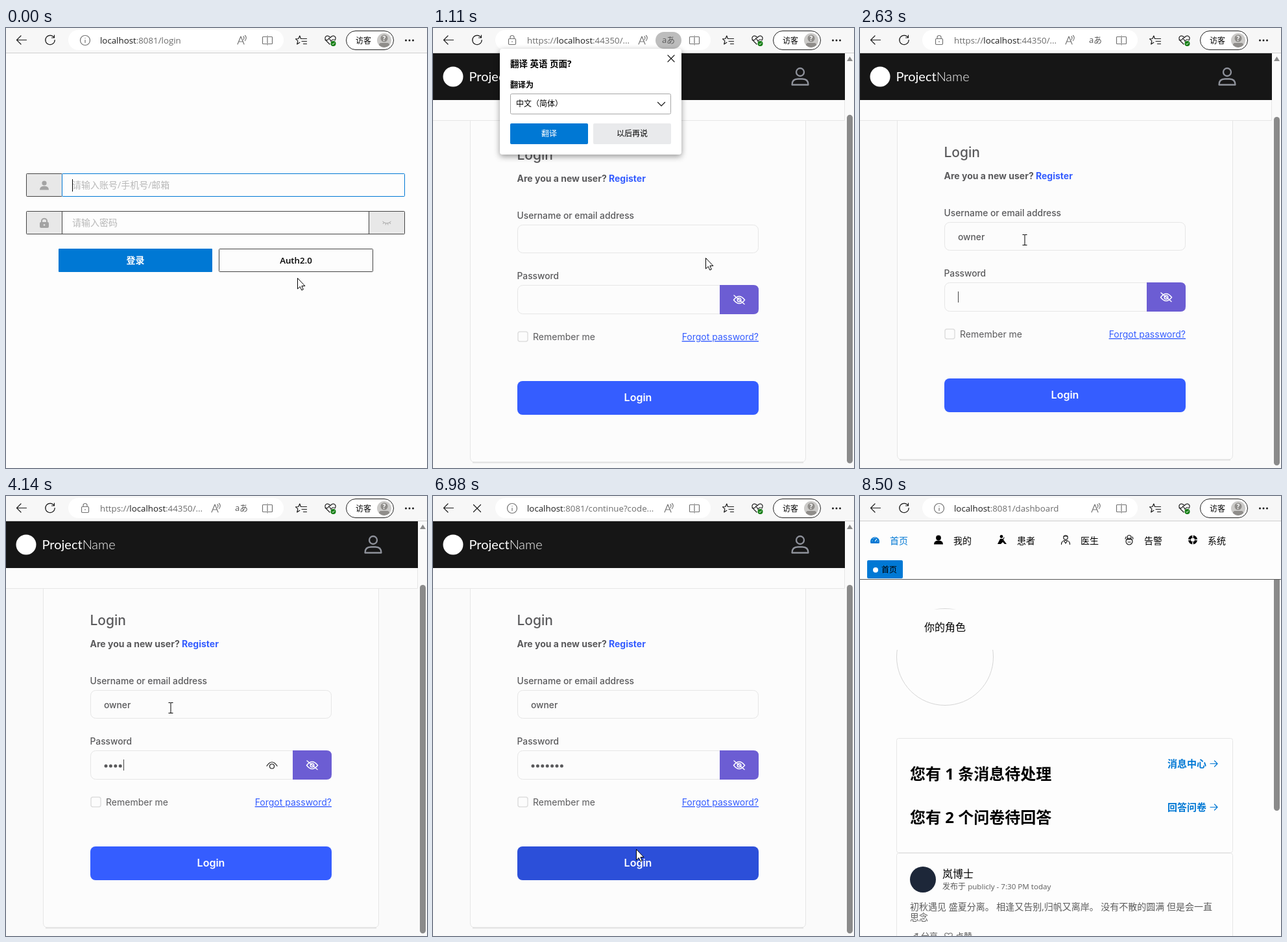
These frames come from a looping animation (649x678 px, 8.65 s). An HTML page:

```html
<!DOCTYPE html>
<html lang="zh-CN">
<head>
<meta charset="utf-8">
<title>Sign-in flow</title>
<style>
  html, body { margin: 0; width: 100%; height: 100%; overflow: hidden; background: #fdfdfd; }
  svg { display: block; width: 649px; height: 678px; }
  text { font-family: "Open Sans", "Noto Sans CJK SC", "Noto Sans CJK", sans-serif; font-size: 14px; white-space: pre; }
  .auth text { font-family: Inter, sans-serif; fill: #5a5a5c; }
  .auth .brand { font: 20px Lato, sans-serif; fill: #fff; }
  .auth .label { font-size: 13.8px; font-weight: 500; }
  .auth .link { fill: #355dff; }
  .auth .white { fill: #fff; }
  .url { font-size: 13.3px; fill: #6c6c6c; }
  .url .host { fill: #1c1c1c; }
  .mid { text-anchor: middle; }
  .b { font-weight: 600; }
  .bb { font-weight: 700; }
  .s { font-size: 12px; }
  .hint { fill: #b8b8b8; }
  .blue { fill: #0078d4; }
  .white { fill: #fff; }
  .gray { fill: #5c5c5c; }
  .line { fill: none; stroke: #1c1c1c; stroke-width: 1.2; stroke-linecap: round; stroke-linejoin: round; }
  .soft { stroke: #737373; }
  .edge { fill: none; stroke: #e6e6e6; }
  .dark { fill: none; stroke: #444; }
  .addon { fill: #e8e8e8; }
  .thumb { fill: #8a8a8a; }
</style>
</head>
<body>
<svg viewBox="0 0 649 678">
  <rect width="649" height="678" fill="#fdfdfd"/>

  <g id="login">
    <path class="addon" d="M31 224h56v36h-56zM31 282h56v36h-56zM559 282h56v36h-56z"/>
    <rect class="dark" x="31.5" y="224.5" width="55" height="35" rx="1"/>
    <rect x="86.5" y="224.5" width="528" height="35" rx="1" fill="none" stroke="#0078d4"/>
    <rect class="dark" x="31.5" y="282.5" width="583" height="35" rx="1"/>
    <path class="dark" d="M86.5 282v36M559.5 282v36"/>
    <g fill="#a3a3a3">
      <circle cx="59" cy="239" r="3.6"/>
      <path d="M52 249.500q0-6 7-6t7 6z"/>
      <rect x="52" y="299" width="14" height="9" rx="2"/>
    </g>
    <path d="M55 299v-1.500a4 3.800 0 0 1 8 0v1.500" fill="none" stroke="#a3a3a3" stroke-width="2"/>
    <circle cx="59" cy="303.500" r="1.300" fill="#e8e8e8"/>
    <path d="M580.500 298q6.500 6 13 0M582.500 300l-1.500 2M585.500 301.500l-.5 2M588.500 301.500l.5 2M591.500 300l1.500 2" fill="none" stroke="#a3a3a3"/>
    <text class="hint" x="102" y="247">请输入账号/手机号/邮箱</text>
    <text class="hint" x="102" y="305">请输入密码</text>
    <path d="M102.500 233v19" stroke="#000"/>
    <rect class="blue" x="81" y="340" width="237" height="36" rx="1"/>
    <text class="mid b white" x="199.500" y="363">登录</text>
    <rect class="dark" x="328.500" y="340.500" width="237" height="35" rx="1"/>
    <text class="mid b" x="447" y="363" style="font-size:13.3px">Auth2.0</text>
  </g>

  <g id="auth" class="auth">
    <rect y="39" width="649" height="639" fill="#fafafa"/>
    <g id="scroll">
      <rect x="57" y="216" width="518" height="551" rx="7" fill="#fcfcfc"/>
      <path class="edge" d="M57.500 216v543q0 7 7 7h503q7 0 7-7V216"/>
      <path d="M61 766.500h510" stroke="#e2e2e2" stroke-width="2"/>
      <text x="129.500" y="300" style="font-size:21px;font-weight:500">Login</text>
      <text class="bb" x="129.500" y="334">Are you a new user? <tspan class="link" x="271">Register</tspan></text>
      <text class="label" x="129.500" y="391">Username or email address</text>
      <rect class="edge" x="130.500" y="400.500" width="371" height="43" rx="8"/>
      <text class="label" id="user" x="151" y="428"></text>
      <path id="userCaret" d="M0 414v17" stroke="#444"/>
      <text class="label" x="129.500" y="484">Password</text>
      <rect class="edge" x="130.500" y="493.500" width="371" height="44" rx="8"/>
      <g id="dots" fill="#5a5a5c"></g>
      <path id="passCaret" d="M0 507v17" stroke="#444"/>
      <g id="eye" class="line" stroke-width="1.500">
        <path d="M402 517q8-12 16 0"/><circle cx="410" cy="517.500" r="3.500"/>
      </g>
      <path d="M442 493h52q8 0 8 8v29q0 8-8 8h-52z" fill="#6c5dd3"/>
      <g fill="none" stroke="#fff" stroke-width="1.500" stroke-linecap="round">
        <path d="M463.500 516q8.500-11 17 0q-8.500 11-17 0M464 509l16 13.500"/><circle cx="472" cy="516" r="2.800"/>
      </g>
      <rect x="131" y="565" width="15" height="15" rx="3" fill="none" stroke="#dedede" stroke-width="1.500"/>
      <text x="154" y="578">Remember me</text>
      <text class="link" x="502" y="578" text-anchor="end" text-decoration="underline">Forgot password?</text>
      <rect id="submit" x="130" y="641" width="372" height="52" rx="8"/>
      <text class="mid b white" x="316" y="672" style="font-size:16px">Login</text>
    </g>
    <rect y="111" width="635" height="31" fill="#fcfcfc"/>
    <path class="edge" d="M0 142.500h634.500V111"/>
    <rect y="39" width="635" height="72" fill="#161616"/>
    <circle cx="31" cy="75" r="15.500" fill="#fff"/>
    <text class="brand" x="55.500" y="82">Project<tspan style="font-weight:300">Name</tspan></text>
    <g fill="none" stroke="#8f929b" stroke-width="2.300">
      <circle cx="566" cy="68" r="6"/>
      <path d="M553.500 87.500q0-9 9-9h7q9 0 9 9z" stroke-linejoin="round"/>
    </g>
    <rect x="635" y="39" width="14" height="639" fill="#fafafa"/>
    <path class="thumb" d="M638 51l4.500-7 4.500 7z"/>
    <rect class="thumb" id="thumb" x="638" y="57" width="9" height="537" rx="4.500"/>
  </g>

  <g id="dash">
    <g id="nav">
      <g id="tabs"></g>
      <path class="blue" d="M16.500 73a7 7.200 0 1 1 13 0z"/>
      <path d="M23 70l3-4M18.500 69h1M20 65.500l.6.600M23 64v1M27 69.500h.8" stroke="#fff" stroke-width="1.200"/>
      <circle cx="121" cy="64.500" r="3.900"/><path d="M114 74.500q0-6 7-6t7 6z"/>
      <circle cx="218" cy="62.500" r="2.400"/><path d="M212 74l4-8h4l6 8h-3l-3-3-3 3z"/>
      <path class="line" d="M222 64l-2 5"/>
      <g class="line"><circle cx="317" cy="64" r="3.200"/><path d="M310.500 74.500q0-6 6.500-6t6.500 6M314 62h6M314.500 69l2.500 4 2.500-4"/></g>
      <g class="line"><circle cx="415" cy="70" r="5"/><circle cx="415" cy="63.500" r="3"/><path d="M411 67h8M413 71h4M410 63l-1 3M420 63l1 3"/></g>
      <circle cx="513" cy="67.500" r="5" fill="none" stroke="#000" stroke-width="4"/>
      <path d="M513 60v4M513 71v4M505.500 67.500h4M516.500 67.500h4" stroke="#fdfdfd" stroke-width="1.500"/>
      <rect class="blue" x="11" y="99" width="55" height="28" rx="2"/>
      <circle cx="24" cy="114" r="4" fill="#fff"/>
      <text class="s" x="33" y="118">首页</text>
      <path d="M0 128.500h649" stroke="#555"/>
    </g>
    <g id="cards">
      <circle cx="131" cy="248" r="74.500" fill="none" stroke="#d6d6d6"/>
      <rect x="55" y="174.500" width="152" height="62.500" fill="#fdfdfd"/>
      <text x="99" y="208" style="font-size:16px">你的角色</text>
      <rect class="edge" x="56.500" y="373.500" width="518" height="176" rx="3"/>
      <g id="notes"></g>
      <path class="thumb" d="M638 129h9v351.500a4.500 4.500 0 0 1-9 0z"/>
    </g>
    <g id="post">
      <rect class="edge" x="56.500" y="550.500" width="518" height="150" rx="3"/>
      <circle cx="97" cy="591" r="20" fill="#1d2739"/>
      <text x="127" y="588" style="font-size:16px">岚博士</text>
      <text class="s gray" x="127" y="606">发布于 <tspan style="font-weight:500;font-size:11.600px">publicly - 7:30 PM today</tspan></text>
      <text class="gray" x="77" y="638">初秋遇见 盛夏分离。 相逢又告别,归帆又离岸。 没有不散的圆满 但是会一直</text>
      <text class="gray" x="77" y="653.500">思念</text>
      <g class="gray">
        <text x="94" y="682.500" style="font-size:13px">分享</text><text x="147" y="682.500" style="font-size:13px">点赞</text>
      </g>
      <path class="line soft" d="M80 680l8-5M85 674.500l4-.5-1 4M136.500 683l-5.500-5.500q-1-4 2.500-4 2 0 3 2 1-2 3-2 3.500 0 2.500 4z"/>
    </g>
  </g>

  <g>
    <rect width="649" height="38" fill="#f7f7f7"/>
    <path d="M0 38.500h649" stroke="#cfcfcf"/>
    <rect x="96" y="3" width="332" height="31" rx="15.500" fill="#fff"/>
    <path class="line" d="M16.500 18.500h15M23 12l-6.500 6.500L23 25"/>
    <path class="line" id="reload" d="M74 14.500a7.200 7.200 0 1 0 1.200 4M74.500 11v4h-4"/>
    <path class="line" id="stop" d="M62.500 13.500l11 11M73.500 13.500l-11 11"/>
    <g id="info" class="line soft"><circle cx="122" cy="19" r="7.500"/><path d="M122 18.500v4M122 15.500v.2"/></g>
    <g id="lock" class="line soft"><rect x="116.500" y="16.500" width="11" height="9" rx="1.500"/><path d="M119 16v-1.500a3 3 0 0 1 6 0V16M122 20.500v1"/></g>
    <text class="url" x="145" y="24"><tspan id="scheme"></tspan><tspan class="host">localhost</tspan><tspan id="path"></tspan></text>
    <rect id="pill" x="343" y="6" width="40" height="26" rx="13" fill="#bdbdbd"/>
    <text id="lang" class="mid gray" x="363" y="23" style="font-size:13px">aあ</text>
    <g id="read" class="line soft"><path d="M357 25l5-12 5 12M358.800 21h6.400M366 13q2 2 0 5M368.500 11.500q3.500 3.500 0 8"/></g>
    <path class="line soft" d="M401.500 13.500h-5q-1 0-1 1v9q0 1 1 1h5M404.500 13.500h5q1 0 1 1v9q0 1-1 1h-5M403 12v14"/>
    <path class="line" d="M457 16.500h-2.500l-1.700-4.500-1.900 4.500-4.400.4 3.400 3-1.200 5 4.100-2.700M457 16.500h6.500M456 20.500h7.500M458.500 24.500h5"/>
    <path class="line" d="M499 25l-6-6q-3-5 2-7 3 0 5 3 2-3 5-3 5 2 2 7M492 18.500h4l2-3 3 5 2-2.500h3"/>
    <circle cx="504.500" cy="24" r="4" fill="#107c10"/><path d="M502.500 24l1.500 1.500 2.500-3" fill="none" stroke="#fff"/>
    <rect x="524.500" y="4.500" width="73" height="29" rx="14.500" fill="#fff" stroke="#222"/>
    <text class="s" x="539" y="23.500">访客</text>
    <circle cx="583" cy="19" r="11" fill="#cbcac8"/>
    <path d="M575 26.500q0-3.500 3-3.500h10q3 0 3 3.500-8 7-16 0z" fill="#8f8d8a"/>
    <circle cx="583" cy="16" r="5.500" fill="#8f8d8a"/>
    <text class="mid bb white" x="583" y="19.500" style="font-size:10px">?</text>
    <g fill="#1c1c1c"><circle cx="616.500" cy="19" r="1.500"/><circle cx="622" cy="19" r="1.500"/><circle cx="627.500" cy="19" r="1.500"/></g>
  </g>

  <g id="popup">
    <rect x="103" y="32" width="280" height="163" rx="4" fill="#fff" style="filter:drop-shadow(0 3px 5px #0006)"/>
    <text class="bb" x="119" y="60" style="font-size:13.500px">翻译 英语 页面?</text>
    <path class="line" stroke-width="1" d="M362 42l10 10M372 42l-10 10"/>
    <text class="s bb" x="119" y="92">翻译为</text>
    <rect x="119.500" y="101.500" width="247" height="31" rx="2" fill="#fff" stroke="#a6a6a6"/>
    <text class="s" x="128" y="121">中文（简体）</text>
    <path class="line" d="M346.500 114.500l5.500 5.500 5.500-5.500"/>
    <rect x="119" y="147" width="120" height="32" rx="2" class="blue"/>
    <rect x="247" y="147" width="120" height="32" rx="2" fill="#e9eaec"/>
    <text class="s mid white" x="179" y="167">翻译</text>
    <text class="s mid" x="307" y="167">以后再说</text>
  </g>

  <g id="cursor" stroke="#000" fill="#fff">
    <path id="arrow" d="M.5.500v16.500l3.800-3.500 2.500 5.500 2.500-1.100-2.400-5.400h5z"/>
    <path id="hand" d="M4.500 12V2q0-1.500 1.500-1.500T7.500 2v6q5-.5 8.500 2v5q0 3-2 5.500H6.500Q4 17 1 13q1-2.500 3.500-1z"/>
    <path id="beam" d="M-3.500-8.500h3l.5.500.5-.5h3M0-8V7.500M-3.500 7.500h7" fill="none"/>
  </g>
</svg>
<script>
const LOOP = 8650;
const $ = id => document.getElementById(id);
const show = (id, on) => $(id).style.display = on ? '' : 'none';

const URLS = {
  login: ['', ':8081/login'],
  account: ['https://', ':44350/Accou...'],
  short: ['https://', ':44350/...'],
  next: ['', ':8081/continue?code...'],
  home: ['', ':8081/dashboard']
};
const USER = 'owner';
const at = (kind, x, y) => ({ kind, x, y });

// Each step lists only what changes at that time.
const steps = [
  [0, { page: 'login', url: 'login', busy: 0, popup: 0, scroll: 0, typed: 0, dots: 0, focus: '', eye: 0, hover: 0, parts: 0, ...at('arrow', 449, 385) }],
  [120, at('hand', 441, 363)],
  [240, { busy: 1 }],
  [360, { page: 'blank', url: 'account', ...at('arrow', 441, 363) }],
  [570, { page: 'auth' }],
  [690, { scroll: 0, ...at('arrow', 438, 362) }],
  [830, { scroll: 32, busy: 0, ...at('arrow', 432, 360) }],
  [970, { scroll: 74, url: 'short', popup: 1, ...at('arrow', 425, 356) }],
  [1110, { scroll: 97, ...at('arrow', 420, 354) }],
  [1230, { scroll: 101, ...at('arrow', 370, 352) }],
  [1360, at('arrow', 300, 346)],
  [1500, at('arrow', 259, 341)],
  [1640, at('beam', 254, 327)],
  [1780, { popup: 0, focus: 'user' }],
  [2080, { typed: 1 }],
  [2260, { typed: 3 }],
  [2440, { typed: 5 }],
  [2630, { focus: 'pass' }],
  [3200, { dots: 1, eye: 1 }],
  [3460, { dots: 2 }],
  [3740, { dots: 3 }],
  [4140, { dots: 4 }],
  [4450, { dots: 5 }],
  [4750, { dots: 6 }],
  [5280, { focus: '' }],
  [5430, { dots: 7, focus: 'pass' }],
  [5870, { focus: '', ...at('beam', 345, 348) }],
  [5990, at('beam', 352, 414)],
  [6110, at('arrow', 336, 496)],
  [6230, { hover: 1, ...at('hand', 318, 542) }],
  [6390, { eye: 0, ...at('hand', 311, 545) }],
  [6550, { busy: 1 }],
  [6980, { url: 'next', ...at('arrow', 313, 544) }],
  [7540, { page: 'blank' }],
  [7660, { page: 'dash', url: 'home', parts: 1 }],
  [7800, { busy: 0, parts: 2 }],
  [7930, { parts: 3 }],
  [8060, at('arrow', 385, 580)],
  [8200, at('arrow', 480, 620)],
  [8340, at('arrow', 575, 655)],
  [8500, { kind: '' }]
];

['首页', '我的', '患者', '医生', '告警', '系统'].forEach((name, i) => {
  $('tabs').innerHTML += `<text x="${46 + 98 * i}" y="74" ${i ? '' : 'class="blue"'}>${name}</text>`;
});
[['您有 1 条消息待处理', '消息中心'], ['您有 2 个问卷待回答', '回答问卷']].forEach(([title, link], i) => {
  const y = 67 * i;
  $('notes').innerHTML += `<text class="bb" x="77" y="${437 + y}" style="font-size:24px">${title}</text>
    <text class="bb blue" x="474" y="${418 + y}" style="font-size:15px">${link}</text>
    <path class="line" style="stroke:#0078d4" d="M540 ${412.5 + y}h11m-4.500-4.500l4.500 4.500-4.500 4.500"/>`;
});
for (let i = 0; i < 7; i++) {
  $('dots').innerHTML += `<circle cx="${154 + 7.4 * i}" cy="517" r="2.500"/>`;
}

function render(s) {
  for (const p of ['login', 'auth', 'dash']) show(p, s.page === p);
  ['nav', 'cards', 'post'].forEach((id, i) => show(id, s.parts > i));
  const [scheme, path] = URLS[s.url];
  $('scheme').textContent = scheme;
  $('path').textContent = path;
  const short = s.url === 'short';
  show('lock', scheme);
  show('info', !scheme);
  show('stop', s.busy);
  show('reload', !s.busy);
  show('lang', short);
  show('pill', s.popup);
  show('popup', s.popup);
  $('read').setAttribute('transform', `translate(${short ? -40 : 0} 0)`);

  $('scroll').setAttribute('transform', `translate(0 ${-s.scroll})`);
  $('thumb').setAttribute('y', 57 + s.scroll * 0.792);
  $('user').textContent = USER.slice(0, s.typed);
  [...$('dots').children].forEach((d, i) => d.style.display = i < s.dots ? '' : 'none');
  show('eye', s.eye);
  show('userCaret', s.focus === 'user');
  show('passCaret', s.focus === 'pass');
  const end = s.typed ? $('user').getComputedTextLength() : 0;
  $('userCaret').setAttribute('transform', `translate(${151.5 + Math.round(end)} 0)`);
  $('passCaret').setAttribute('transform', `translate(${Math.round(151 + 7.4 * s.dots) + 0.5} 0)`);
  $('submit').setAttribute('fill', s.hover ? '#2c4fd9' : '#355dff');

  for (const k of ['arrow', 'hand', 'beam']) show(k, s.kind === k);
  $('cursor').setAttribute('transform', `translate(${s.x} ${s.y})`);
}

const start = performance.now();
let last = -1;
function tick() {
  const t = (performance.now() - start) % LOOP;
  const n = steps.filter(([time]) => time <= t).length;
  if (n !== last) {
    render(Object.assign({}, ...steps.slice(0, n).map(([, change]) => change)));
    last = n;
  }
  requestAnimationFrame(tick);
}
tick();
</script>
</body>
</html>
```
